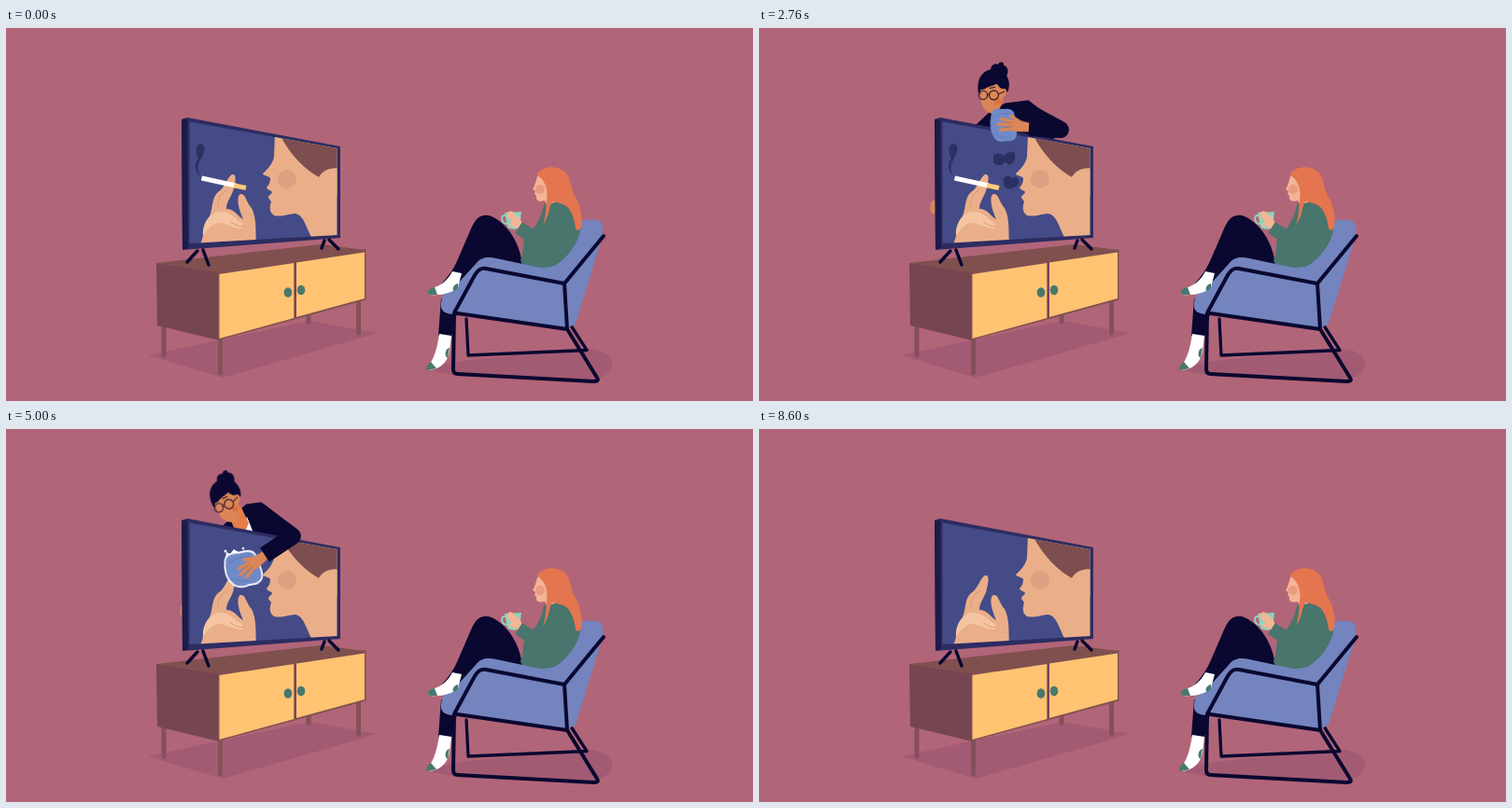
Animation, 800 px wide and 400 px high, one loop 8.64 s. Source, as an HTML page without scripts:

```html
<!DOCTYPE html>
<html lang="en">
<head>
<meta charset="utf-8">
<title>Evening television</title>
<style>
html, body { margin: 0; width: 100%; height: 100%; overflow: hidden; background: #b16578; }
svg { display: block; width: 100vw; height: 100vh; }
.a { animation: 8.64s ease-in-out infinite; }
.ink { fill: #0a0830; }
.line { fill: none; stroke: #0a0830; stroke-linecap: round; stroke-linejoin: round; }
.tan { fill: #da8657; }
.skin { fill: #f2b595; }
.pic { fill: #eaae89; }
.smoke { fill: #2d3062; }
.wood { fill: #80504f; }
.leg { stroke: #84505a; stroke-width: 5; stroke-linecap: round; }

/* tea drinker */
#sleeve { animation-name: sleeve; }
#mug { animation-name: mug; transform-origin: 542px 206px; }
@keyframes sleeve {
  0%, 8%, 21%, 69%, 84%, 100% { d: path("M589 204 L566 225 L549 214"); }
  13%, 16.5% { d: path("M591 207 L554 222 L556 193"); }
  74.5%, 78% { d: path("M591 207 L553 223 L553 197"); }
}
@keyframes mug {
  0%, 8%, 21%, 69%, 84%, 100% { transform: none; }
  13%, 16.5% { transform: translate(12px, -24px) rotate(14deg); }
  74.5%, 78% { transform: translate(8px, -20px) rotate(6deg); }
}

/* smoke on the screen */
#curl { animation-name: curl; transform-origin: 208px 158px; }
#cig { animation-name: cig; }
#wisp { animation-name: wisp; transform-origin: 279px 177px; }
.puff { animation-name: var(--n); }
@keyframes curl {
  0%, 14%, 28% { transform: none; opacity: 1; }
  7%, 21% { transform: skewX(4deg) scaleY(.95); }
  36.5% { transform: none; opacity: 1; }
  38%, 100% { opacity: 0; }
}
@keyframes cig { 0%, 38.5% { opacity: 1; } 40%, 100% { opacity: 0; } }
@keyframes wisp {
  0%, 8% { transform: scale(0); opacity: 0; }
  13.5%, 16% { transform: none; opacity: 1; }
  23%, 100% { transform: translate(-8px, -14px); opacity: 0; }
}
@keyframes p1 {
  0%, 17% { transform: translate(268px, 166px) scale(.3); opacity: 0; }
  32% { transform: translate(257px, 141px); opacity: 1; }
  41.2% { transform: translate(241px, 116px); opacity: .65; }
  48%, 100% { transform: translate(236px, 110px); opacity: 0; }
}
@keyframes p2 {
  0%, 19% { transform: translate(270px, 168px) scale(.3); opacity: 0; }
  32% { transform: translate(268px, 140px); opacity: 1; }
  41.2% { transform: translate(249px, 129px); opacity: .65; }
  49%, 100% { transform: translate(246px, 118px); opacity: 0; }
}
@keyframes p3 {
  0%, 23% { transform: translate(277px, 176px) scale(.2); opacity: 0; }
  32% { transform: translate(270px, 165px); opacity: 1; }
  41.2% { transform: translate(261px, 128px); opacity: .65; }
  50%, 100% { transform: translate(256px, 114px); opacity: 0; }
}

/* cleaner */
.rise { animation-name: rise; }
#gate { animation-name: gate; animation-timing-function: step-end; }
#head { animation-name: head; transform-origin: 249px 62px; }
#torso { animation-name: torso; }
#chest { animation-name: chest; }
#arm { animation-name: arm; }
#hand { animation-name: hand; }
#cloth { animation-name: cloth; }
#suds { animation-name: suds; }
#streak { animation-name: streak; }
#drops { animation-name: drops; }
#grip { animation-name: grip; }
#rest { animation-name: rest; }
@keyframes rise {
  0%, 20.9% { transform: translateY(100px); }
  27.5%, 76% { transform: none; }
  81.4%, 100% { transform: translateY(100px); }
}
@keyframes gate {
  0%, 76%, 100% { d: path("M100 0H420V139L358 128L190 98H100Z"); }
  27.5% { d: path("M100 0H420V400L358 400L190 400H100Z"); }
}
@keyframes head {
  0%, 34% { transform: none; }
  40%, 48% { transform: translate(-13px, 5px) rotate(-11deg); }
  56%, 63% { transform: translate(-16px, 10px) rotate(-20deg); }
  70%, 100% { transform: translate(7px, 4px) rotate(-20deg); }
}
@keyframes torso {
  0%, 34% { d: path("M232 106 L247 92 L264 82 L288 79 L326 108 L300 130 L235 130Z"); }
  40%, 48% { d: path("M233 106 L243 95 L262 81 L278 78 L290 104 L290 130 L235 130Z"); }
  56%, 63% { d: path("M232 106 L242 96 L258 82 L273 80 L308 108 L300 130 L235 130Z"); }
  70%, 100% { d: path("M234 106 L249 97 L268 93 L302 87 L340 112 L320 130 L235 130Z"); }
}
@keyframes chest {
  0%, 34%, 70%, 100% { transform: translate(8px, 26px); }
  40%, 48% { transform: none; }
  56%, 63% { transform: translate(-3px, 2px); }
}
@keyframes arm {
  0%, 33% { d: path("M284 88 L323 109 L289 107"); }
  36% { d: path("M282 88 L290 106 L252 116"); }
  38.5% { d: path("M280 88 L283 112 L242 130"); }
  41.2%, 47% { d: path("M276 87 L283 116 L264 157"); }
  44% { d: path("M278 88 L283 114 L249 138"); }
  50.5% { d: path("M276 88 L290 110 L254 124"); }
  54%, 64% { d: path("M272 88 L302 116 L282 143"); }
  57.9% { d: path("M271 88 L307 115 L277 135"); }
  61% { d: path("M272 88 L310 110 L278 116"); }
  70%, 100% { d: path("M300 95 L337 114 L302 104"); }
}
@keyframes hand {
  0%, 33% { transform: translate(288px, 106px) rotate(5deg); }
  36% { transform: translate(247px, 117px) rotate(-34deg); }
  38.5% { transform: translate(237px, 131px) rotate(-34deg); }
  41.2%, 47% { transform: translate(263px, 159px) rotate(-58deg); }
  44% { transform: translate(244px, 140px) rotate(-42deg); }
  50.5% { transform: translate(249px, 125px) rotate(-36deg); }
  54%, 64% { transform: translate(280px, 145px) rotate(-46deg); }
  57.9% { transform: translate(276px, 136px) rotate(-39deg); }
  61% { transform: translate(274px, 117px) rotate(-26deg); }
  70%, 100% { transform: translate(303px, 104px) rotate(10deg); }
}
@keyframes cloth {
  0%, 33% { transform: translate(262px, 104px) rotate(0deg) scale(.78, 1); }
  36% { transform: translate(225px, 136px) rotate(30deg); }
  38.5% { transform: translate(214px, 149px) rotate(36deg); }
  41.2%, 47% { transform: translate(247px, 181px) rotate(38deg) scale(.9); }
  44% { transform: translate(222px, 160px) rotate(36deg); }
  50.5% { transform: translate(229px, 142px) rotate(20deg); }
  54%, 64% { transform: translate(263px, 166px) rotate(-6deg); }
  57.9% { transform: translate(254px, 150px) rotate(-10deg); }
  61% { transform: translate(250px, 131px) rotate(-6deg); }
  70%, 100% { transform: translate(278px, 98px) rotate(0deg) scale(.8, .96); }
}
@keyframes suds { 0%, 34% { opacity: 0; } 36%, 63% { opacity: 1; } 66%, 100% { opacity: 0; } }
@keyframes streak { 0%, 38.5% { opacity: 0; } 40.5%, 42% { opacity: 1; } 45%, 100% { opacity: 0; } }
@keyframes drops { 0%, 55% { opacity: 0; } 57%, 59% { opacity: 1; } 62%, 100% { opacity: 0; } }
@keyframes grip {
  0%, 26% { transform: translateX(9px); }
  29%, 48% { transform: none; }
  57.9% { transform: translate(3px, 3px); }
  61%, 100% { transform: translateX(9px); }
}
@keyframes rest {
  0%, 66% { transform: translateY(18px); }
  70%, 76% { transform: none; }
  79%, 100% { transform: translateY(18px); }
}
</style>
</head>
<body>
<svg viewBox="0 0 800 400" preserveAspectRatio="none">
<defs>
  <clipPath id="screen"><path d="M196.500 100.500L354.500 129V222L196.500 231Z"/></clipPath>
  <clipPath id="above"><path d="M100 0H420V139L358 128L190 98H100Z"/></clipPath>
  <clipPath id="front"><path id="gate" class="a" d="M100 0H420V139L358 128L190 98H100Z"/></clipPath>
  <path id="rag" d="M-17 -11C-16 -18 -8 -18 0 -17C7 -18 14 -17 15 -11C16 -4 19 4 18 10C17 17 10 18 4 17C-3 19 -11 18 -14 12C-19 7 -19 -4 -17 -11Z"/>
</defs>
<rect width="800" height="400" fill="#b16578"/>

<!-- cabinet -->
<path d="M152 351L325 314L398 327L232 375Z" fill="#a25b73"/>
<path class="leg" d="M169 320V351M229.500 332V370M324 306V315M377.500 292V327"/>
<path class="wood" d="M161 252L337 232L385 238L228 263Z"/>
<path d="M161 252L228 262.500V335L162 319Z" fill="#75464f"/>
<path class="wood" d="M227 262.500L385.500 237V291.500L227 335Z"/>
<path d="M228.500 264L308.500 252V311L228.500 333Z" fill="#ffc372"/>
<path d="M311 251.500L384 240.500V290L311 310Z" fill="#ffc372"/>
<path d="M309.700 251.500V310.500" stroke="#7d3f58" stroke-width="2"/>
<g fill="#47796d"><ellipse cx="302" cy="283.500" rx="4.300" ry="5.300"/><ellipse cx="316" cy="281" rx="4.300" ry="5.300"/></g>

<!-- cleaner behind the set -->
<path id="grip" class="a tan" d="M190 184C186 185 183 187 184 190L183 194L185 199L190 199Z"/>
<g clip-path="url(#above)"><g class="a rise">
  <path id="torso" class="a ink" stroke="#0a0830" stroke-width="3" stroke-linejoin="round" d="M232 106L247 92L264 82L288 79L326 108L300 130L235 130Z"/>
  <g id="chest" class="a">
    <path d="M254 112L261 92L269 112Z" fill="#fff"/>
    <path d="M240 86L254 80L263 99L257 112L247 104Z" fill="#e67c48"/>
  </g>
  <g id="head" class="a">
    <path class="ink" d="M235 70C232 54 240 43 254 44C265 46 270 56 267 67L260 74Z"/>
    <path class="ink" d="M249 48C246 40 253 37 256 39C258 35 263 36 262 40C268 41 268 51 262 54Z"/>
    <path class="tan" d="M237 66C241 65 249 62 255 60C257 63 259 66 263 65C266 66 266 71 261 75C261 82 257 89 252 92C245 92 240 87 238 80Z"/>
    <circle cx="256" cy="79" r="3.500" fill="#e0713f"/>
    <path d="M237 66L243 64.500M247 64.500L253 63.500" stroke="#0a0830"/>
    <g fill="none" stroke="#452332" stroke-width="1.300"><circle cx="240" cy="72" r="4.700"/><circle cx="251.500" cy="72" r="5"/><path d="M244.500 71.500H246.500M256.500 71L263 68"/></g>
  </g>
</g></g>

<!-- television -->
<path d="M188 98L194 96L358 127V225L189 238Z" fill="#2d2c61"/>
<path d="M188 98L194 97.500L195 236L189 238Z" fill="#1c1c4c"/>
<path d="M196.500 100.500L354.500 129V222L196.500 231Z" fill="#444b87"/>
<path class="line" stroke-width="3.500" d="M205 239L194 251M211 238L217 254M341 228L338 236M346 227L356 237"/>
<g clip-path="url(#screen)">
  <path class="pic" d="M288 114L287 138C286 144 282 150 275 156C276 159 281 158 283 161C283 165 282 168 279 171C280 174 284 174 285 176C284 179 281 179 281 182L284 186C282 192 282 198 287 201C295 203 304 199 310 199C319 201 321 213 328 226H360V114Z"/>
  <path d="M293 114L357 126V151C348 149 341 153 337 161C322 153 305 138 293 114Z" fill="#7d4e4f"/>
  <path class="pic" d="M334 162C338 153 346 149 357 151V180H340Z"/>
  <circle cx="301" cy="162" r="10" fill="#df9f80"/>
  <path class="pic" d="M208 232C214 219 210 210 218 202C222 192 220 182 227 176C235 171 236 161 242 157C247 156 246 163 244 171C243 179 236 185 236 194C244 193 249 203 254 205C249 194 246 181 251 178C257 177 257 187 263 193C269 205 267 219 268 231Z"/>
  <path d="M211 223C210 212 215 204 222 199C232 194 241 199 249 207C255 210 256 213 251 215C240 214 233 208 227 209C219 211 216 216 211 223Z" fill="#f5c5a2"/>
  <path d="M227 192C226 184 231 176 236 174M240 208C246 211 250 214 255 212" fill="none" stroke="#d99979"/>
  <g id="cig" class="a" fill="none" stroke-width="5"><path d="M209.500 161L246 169" stroke="#fff"/><path d="M244 168.700L257 171.500" stroke="#ffcb78"/></g>
  <path id="curl" class="a smoke" d="M208 159C201 152 202 145 206 140C202 134 203 125 208 124C214 124 213 132 210 138C205 146 204 151 208 159Z"/>
  <path id="wisp" class="a smoke" d="M280 178C268 178 271 167 262 163C253 160 249 154 251 148C255 149 255 154 259 155C258 148 261 142 265 141C268 146 264 150 268 153C274 157 272 166 276 171Z"/>
  <path class="a puff smoke" style="--n:p1" d="M-6 -5C0 -9 7 -5 6 2C4 8 -3 7 -6 3Z"/>
  <path class="a puff smoke" style="--n:p2" d="M-7 2C-7 -4 -2 -8 5 -7C8 -2 6 5 0 7Z"/>
  <path class="a puff smoke" style="--n:p3" d="M-8 -4C-4 -8 0 -6 1 -3C5 -8 9 -4 8 2C4 8 -5 10 -8 3Z"/>
</g>

<!-- cleaning arm -->
<g id="streak" class="a">
  <path d="M208 159L216 155L215 159L223 152L222 158L231 149L230 157L237 152L236 159L241 158L239 164L246 167L229 177L224 171L218 172L220 167L213 166L217 162Z" fill="#fff"/>
  <path d="M207 155L213 151M217 150L225 145M228 148L231 146M222 190C227 200 240 203 256 205" stroke="#fff" stroke-width="2.200" fill="none"/>
</g>
<g id="drops" class="a" fill="#fff"><path d="M235 140L236 132L240 134L244 129L249 132L256 130L253 136L240 142Z"/><circle cx="235" cy="131" r="1.500"/><circle cx="254" cy="128" r="1.300"/></g>
<g clip-path="url(#front)"><g class="a rise">
  <g id="cloth" class="a">
    <use id="suds" class="a" href="#rag" fill="#fff" stroke="#fff" stroke-width="3.500"/>
    <use href="#rag" fill="#708ac8"/>
    <path d="M-13 -8C-8 -13 4 -13 10 -11M-12 8C-8 12 -2 14 3 13" fill="none" stroke="#617bb9"/>
  </g>
  <g id="hand" class="a">
    <path class="tan" d="M4 -4L-9 -6C-14 -7 -18 -6 -19 -2L-16 6L-8 6L4 5Z"/>
    <path d="M-16 -4L-29 -6M-17 -1L-32 0M-15 3L-29 6M-8 -4L-19 -10" stroke="#da8657" stroke-width="3.500" stroke-linecap="round"/>
    <path d="M-17 -3L-27 -3M-16 1L-26 3" stroke="#b86944" stroke-width=".8"/>
  </g>
  <path id="arm" class="a line" stroke-width="18" style="stroke-linecap:butt" d="M284 88L323 109L289 107"/>
</g></g>
<g clip-path="url(#above)"><path id="rest" class="a tan" d="M204 101C205 96 210 94 214 96L221 101L220 105L205 102Z"/></g>

<!-- chair and tea drinker -->
<path d="M448 366C475 355 560 351 610 345C635 341 650 350 649 362C646 374 630 381 600 379L482 373Z" fill="#a25b73"/>
<path class="line" stroke-width="3.300" d="M493 312L495 351L622 345.500L603 316"/>
<path d="M606 212C614 205 629 204 636 207C640 211 640 218 638 226L610 317L600 323L584 258Z" fill="#7384bf"/>
<path class="ink" d="M553 256C552 232 536 207 517 201C505 199 501 208 496 220L483 250C478 261 472 268 466 275L484 281L494 267L513 246L535 252Z"/>
<path class="ink" d="M466 290L463 330L477 331L484 302Z"/>
<path d="M464 328L477 330L475 347C473 358 465 366 453 367L452 363C459 354 462 342 464 328Z" fill="#fff"/>
<path d="M475 343C470 344 469 352 473 354ZM455 358C450 361 449 366 452 367L461 365Z" fill="#47796d"/>
<path d="M576 190C580 184 589 185 592 188C605 190 612 199 616 212C614 231 601 247 585 257C569 260 552 257 551 249C556 239 552 229 557 223C567 215 573 204 576 190Z" fill="#48756c"/>
<g id="mug" class="a">
  <path d="M534 198L552 197L550 214C545 217 539 216 537 213Z" fill="#91d2bb"/>
  <path d="M535 201C529 200 530 210 537 210" fill="none" stroke="#91d2bb" stroke-width="2"/>
  <path class="skin" d="M537 199C537 196 542 195 544 199L550 204L554 211L551 217L544 213L538 211L542 207L537 203Z"/>
</g>
<path id="sleeve" class="a" d="M589 204L566 225L549 214" fill="none" stroke="#48756c" stroke-width="14" stroke-linejoin="round"/>
<path class="skin" d="M571 155C568 160 568 166 564 173L567 175L566 178L568 180C567 185 571 187 577 185L579 189L588 187V156Z"/>
<circle cx="572" cy="173" r="5" fill="#e99b7d"/>
<path d="M569 156C575 148 589 147 597 153C605 158 604 170 609 180C615 189 618 202 616 214C614 218 611 217 610 215C609 206 606 196 600 191C594 187 589 187 585 186C581 193 582 202 575 211C579 200 578 191 579 184C581 174 577 162 569 158Z" fill="#e4754f"/>
<path d="M466 296C466 285 475 280 483 275L503 253C508 246 516 245 525 247L572 257C586 257 591 254 600 247L616 225L627 232L598 275L601 323L480 307C470 307 465 303 466 296Z" fill="#7384bf"/>
<path d="M478 261L488 263L484 278C478 284 467 287 454 286C450 284 452 281 456 279C465 277 473 271 478 261Z" fill="#fff"/>
<path d="M459 278C451 279 450 285 454 286L462 286ZM484 274C479 275 477 281 480 282L484 279Z" fill="#47796d"/>
<path class="line" stroke-width="4" d="M640 223L598 274L514 258C508 257 505 260 502 265L480 305.500L601 323L598 274M601 323L633 375C635 378 633 379 629 379L484 371C480 371 479 369 479 366L480 305.500"/>
</svg>
</body>
</html>
```
